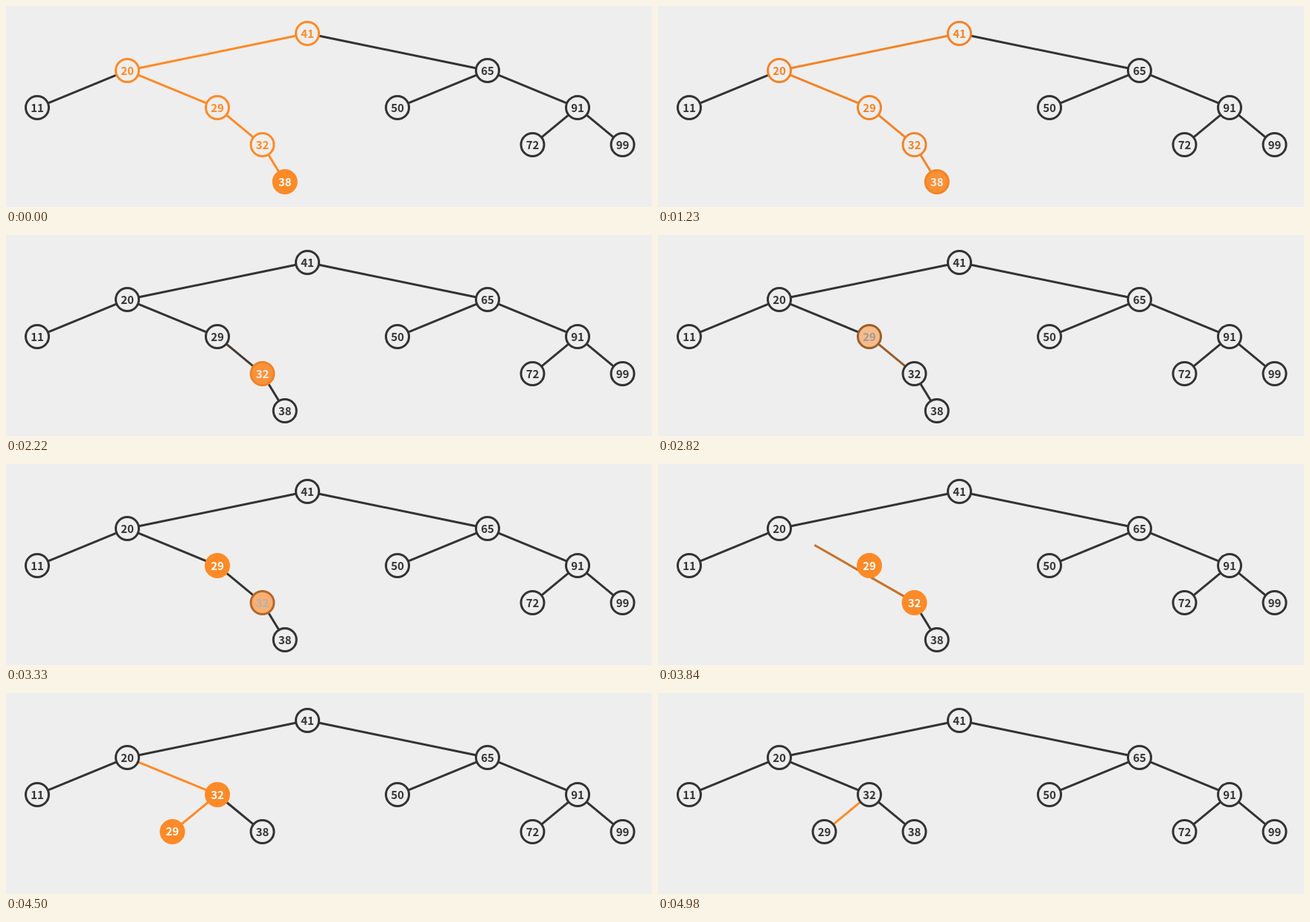
An HTML page that plays this animation: 868 by 271 pixels, repeating every 7020 ms.

```html
<!DOCTYPE html>
<html lang="en">
<head>
<meta charset="utf-8">
<title>Tree rotation</title>
<style>
  html, body { margin: 0; width: 100%; height: 100%; overflow: hidden; background: #eee; }
  svg { display: block; width: 868px; height: 271px; }
  line, circle { stroke-width: 3; }
  text {
    font: bold 15px "Noto Sans CJK JP", "Noto Sans CJK SC", "Noto Sans", sans-serif;
    text-anchor: middle;
  }
</style>
</head>
<body>
<svg viewBox="0 0 868 271"></svg>
<script>
const LOOP = 7020, TICK = 30;
const FIRST = 1107, STEP = 489;   // eight transitions, back to back
const NOTICE = 0.045;             // colour shifts below this do not show

const DARK = [51, 51, 51], ORANGE = [255, 138, 39];
const PAPER = [238, 238, 238], WHITE = [255, 255, 255];

// stroke, fill and text colour in one list
const plain = [...DARK, ...PAPER, ...DARK];
const ring = [...ORANGE, ...PAPER, ...ORANGE];
const solid = [...ORANGE, ...ORANGE, ...WHITE];

// Tracks: [start value, [step, next value], ...]
const nodes = {
  41: { at: [405, 37], look: [ring, [0, plain]] },
  20: { at: [163, 87], look: [ring, [0, plain]] },
  65: { at: [647, 87] },
  11: { at: [42, 137] },
  29: { at: [284, 137], to: [223.5, 187], look: [ring, [0, plain], [3, solid], [7, plain]] },
  50: { at: [526, 137] },
  91: { at: [768, 137] },
  32: { at: [344.5, 187], to: [284, 137],
        look: [ring, [0, plain], [1, solid], [2, plain], [4, solid], [7, plain]] },
  72: { at: [707.5, 187] },
  99: { at: [828.5, 187] },
  38: { at: [374.75, 237], to: [344.5, 187], look: [solid, [0, plain]] }
};

const edges = [
  { child: 20, parent: 41, look: [ORANGE, [0, DARK]] },
  { child: 65, parent: 41 },
  { child: 11, parent: 20 },
  { child: 29, parent: 20, next: 32, look: [ORANGE, [0, DARK], [5, ORANGE]] },
  { child: 50, parent: 65 },
  { child: 91, parent: 65 },
  { child: 32, parent: 29, next: 20,
    look: [ORANGE, [0, DARK], [2, ORANGE], [3, DARK], [5, ORANGE], [7, DARK]] },
  { child: 72, parent: 91 },
  { child: 99, parent: 91 },
  { child: 38, parent: 32, look: [ORANGE, [0, DARK]] }
];

const svg = document.querySelector("svg");

function add(parent, tag, attrs = {}) {
  const el = document.createElementNS("http://www.w3.org/2000/svg", tag);
  for (const key in attrs) el.setAttribute(key, attrs[key]);
  return parent.appendChild(el);
}

function ease(t) {
  return t < 0.5 ? 4 * t ** 3 : 1 - 4 * (1 - t) ** 3;
}

function valueAt([first, ...changes], time, floor = 0) {
  let value = first;
  for (const [step, next] of changes) {
    const t = Math.min((time - FIRST) / STEP - step, 1);
    if (t <= 0) break;
    const p = ease(t);
    if (p >= floor) value = value.map((v, i) => v + (next[i] - v) * p);
  }
  return value;
}

const rgb = (c, i = 0) => `rgb(${c.slice(i, i + 3).map(Math.round)})`;

// Segment between the rims of two nodes
function span([ax, ay], [bx, by]) {
  const k = 16 / Math.hypot(bx - ax, by - ay);
  const dx = (bx - ax) * k, dy = (by - ay) * k;
  return [ax + dx, ay + dy, bx - dx, by - dy];
}

for (const edge of edges) {
  const before = id => nodes[id].at;
  const after = id => nodes[id].to || nodes[id].at;
  const { child, parent, next = parent } = edge;
  edge.path = [
    span(before(parent), before(child)),
    [5, span(before(next), before(child))],
    [6, span(after(next), after(child))]
  ];
  edge.look ||= [DARK];
  edge.line = add(svg, "line");
}

for (const id in nodes) {
  const node = nodes[id];
  node.look ||= [plain];
  node.path = [node.at, [6, node.to || node.at]];
  node.group = add(svg, "g");
  node.circle = add(node.group, "circle", { r: 15.5 });
  node.label = add(node.group, "text", { y: 5.5 });
  node.label.textContent = id;
}

function draw(time) {
  for (const { line, path, look } of edges) {
    const ends = valueAt(path, time);
    ["x1", "y1", "x2", "y2"].forEach((key, i) => line.setAttribute(key, ends[i]));
    line.setAttribute("stroke", rgb(valueAt(look, time, NOTICE)));
  }
  for (const { group, circle, label, path, look } of Object.values(nodes)) {
    const colours = valueAt(look, time, NOTICE);
    group.setAttribute("transform", `translate(${valueAt(path, time)})`);
    circle.setAttribute("stroke", rgb(colours));
    circle.setAttribute("fill", rgb(colours, 3));
    label.setAttribute("fill", rgb(colours, 6));
  }
}

const start = performance.now();

function frame() {
  const time = (performance.now() - start) % LOOP;
  draw(Math.floor(time / TICK) * TICK);
  requestAnimationFrame(frame);
}
frame();
</script>
</body>
</html>
```
